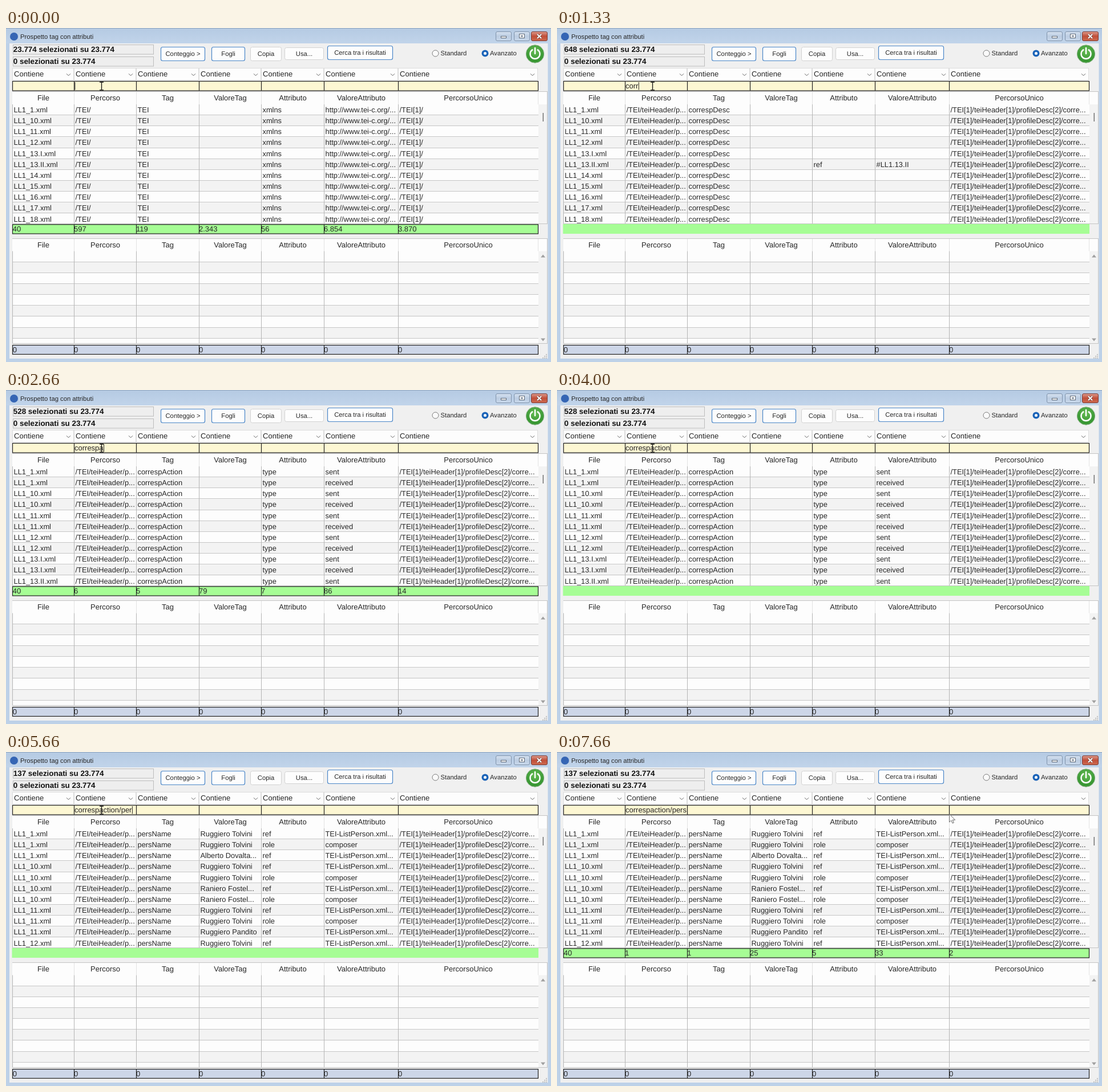
Recreate the animation shown at these times as an HTML page. Size 955 by 586 pixels, loop 8000 ms.

```html
<!DOCTYPE html>
<html lang="it">
<head>
<meta charset="utf-8">
<title>Prospetto tag con attributi</title>
<style>
html, body { margin: 0; width: 100%; height: 100%; overflow: hidden; background: #bdd1e8; }
svg { display: block; width: 955px; height: 586px; }
text { font: 13px "Liberation Sans", Arial, sans-serif; fill: #262626; white-space: pre; text-rendering: geometricPrecision; }
.ui { font-size: 11.25px; }
.cell { font-size: 12.85px; }
.bold { font-size: 13.4px; font-weight: 700; fill: #111; }
.mid { text-anchor: middle; }
</style>
</head>
<body>
<svg id="stage" viewBox="0 0 955 586">
  <defs>
    <linearGradient id="bar" x2="0" y2="1"><stop offset="0" stop-color="#b5cae3"/><stop offset="1" stop-color="#c1d4ea"/></linearGradient>
    <linearGradient id="winBtn" x2="0" y2="1"><stop offset="0" stop-color="#d5e1f0"/><stop offset=".5" stop-color="#bccde2"/><stop offset="1" stop-color="#c8d8eb"/></linearGradient>
    <linearGradient id="closeBtn" x2="0" y2="1"><stop offset="0" stop-color="#dc9a8c"/><stop offset=".5" stop-color="#c14f39"/><stop offset="1" stop-color="#cd6b50"/></linearGradient>
    <radialGradient id="power" cy=".35"><stop offset="0" stop-color="#68bd56"/><stop offset="1" stop-color="#3a9834"/></radialGradient>
    <clipPath id="rowClip"><rect x="11" y="134" width="922" height="210"/></clipPath>
    <clipPath id="fieldClip"><rect x="119" y="93" width="109" height="18"/></clipPath>
  </defs>
  <g id="base"></g>
  <g id="live"></g>
</svg>
<script>
const LOOP = 8000;
const EDGES = [11.5, 119.5, 228.5, 338.5, 447.5, 557.5, 687.5, 932.5];
const HEADS = ['File', 'Percorso', 'Tag', 'ValoreTag', 'Attributo', 'ValoreAttributo', 'PercorsoUnico'];
const ROW = 19.15;
const base = document.getElementById('base');
const live = document.getElementById('live');

function add(parent, tag, attrs, content) {
  const el = document.createElementNS('http://www.w3.org/2000/svg', tag);
  for (const key in attrs) el.setAttribute(key, attrs[key]);
  if (content !== undefined) el.textContent = content;
  parent.append(el);
  return el;
}
const rect = (p, x, y, width, height, fill, more) => add(p, 'rect', { x, y, width, height, fill, ...more });
const path = (p, d, stroke, more) => add(p, 'path', { d, stroke, fill: 'none', ...more });
const label = (p, x, y, str, cls = '') => add(p, 'text', { x, y, class: cls }, str);
const circle = (p, cx, cy, r, fill, more) => add(p, 'circle', { cx, cy, r, fill, ...more });

function cells(p, top, height, fill) {
  const d = EDGES.slice(1, -1).map(x => `M${x} ${top}v${height}`).join('');
  rect(p, 11.5, top, 921, height, fill, { stroke: '#222', 'stroke-width': 1.2 });
  path(p, d, '#222', { 'stroke-width': 1.2 });
}

function sums(p, baseline, values) {
  values.forEach((v, i) => label(p, EDGES[i] + (i ? -.5 : .3), baseline, v));
}

function drawTable(top, first, bottom) {
  rect(base, 11, top, 938, bottom - top, '#fdfdfd');
  rect(base, 933, first, 16, bottom - first, '#f3f3f3');
  let lines = '';
  for (let i = 0, y = first; y < bottom; i++, y += ROW) {
    if (i % 2) rect(base, 11, y, 922, Math.min(ROW, bottom - y), '#f3f3f3');
    if (i) lines += `M11 ${Math.round(y) - .5}H933`;
  }
  path(base, lines, '#c6c6c6');
  path(base, EDGES.slice(1).map(x => `M${x} ${top}V${first}`).join(''), '#e2e2e2');
  path(base, EDGES.slice(0, -1).map(x => `M${x} ${first}V${bottom}`).join(''), '#b5b5b5');
  path(base, `M11 ${top + .5}H949M11 ${bottom - .5}H949M948.5 ${top}V${bottom}`, '#c4c4c4');
  HEADS.forEach((h, i) => label(base, (EDGES[i] + EDGES[i + 1]) / 2, top + 16, h, 'mid'));
}

function button(x, y, w, h, str, strong) {
  rect(base, x + .5, y + .5, w - 1, h - 1, '#fdfdfd', { rx: 3, stroke: strong ? '#4a86c8' : '#d2d2d2', 'stroke-width': strong ? 1.2 : 1 });
  label(base, x + w / 2, y + h / 2 + 3.7, str, 'ui mid');
}

function drawWindow() {
  rect(base, 0, 0, 955, 586, '#bdd1e8');
  rect(base, 0, 0, 955, 27, 'url(#bar)');
  path(base, 'M0 .5H955', '#8fa5bf');
  rect(base, 6, 27, 943.5, 553, '#f0f0f0');
  circle(base, 14, 15, 7, '#3565b4');
  label(base, 25, 19, 'Prospetto tag con attributi', 'ui');

  [[858.5, 'winBtn'], [890.5, 'winBtn'], [920.5, 'closeBtn']].forEach(([x, fill], i) =>
    rect(base, x, 6.5, i > 1 ? 28 : 27, 16, `url(#${fill})`, { rx: 2.5, stroke: i > 1 ? '#7d3c36' : '#8093ab' }));
  rect(base, 867.5, 14.5, 9, 3, '#fff', { stroke: '#5c6775' });
  rect(base, 899.5, 10.5, 9, 7, '#fff', { stroke: '#5c6775' });
  rect(base, 902.5, 13.5, 3, 1.5, '#b9c9dd', { stroke: '#5c6775', 'stroke-width': .8 });
  path(base, 'M931 11l7 7m0-7l-7 7', '#6d423e', { 'stroke-width': 3.6 });
  path(base, 'M931 11l7 7m0-7l-7 7', '#fff', { 'stroke-width': 2.1 });

  [29.5, 50.5].forEach(y => rect(base, 12.5, y, 246, 16.5, '#eeeeee', { stroke: '#bcbcbc' }));
  label(base, 12.8, 62.7, '0 selezionati su 23.774', 'bold');

  button(271, 33, 78, 25, 'Conteggio >', true);
  button(360, 33, 59, 25, 'Fogli', true);
  button(428, 33, 55, 25, 'Copia');
  button(488, 34, 69, 22, 'Usa...');
  button(563, 31, 115, 25, 'Cerca tra i risultati', true);

  circle(base, 752.5, 44.5, 5.5, '#fafafa', { stroke: '#777' });
  label(base, 761.5, 48, 'Standard', 'ui');
  circle(base, 839.5, 44.5, 6, '#1a63b8');
  circle(base, 839.5, 44.5, 2.5, '#fff');
  label(base, 848, 48, 'Avanzato', 'ui');

  circle(base, 927, 45.5, 15.7, 'url(#power)', { stroke: '#8db58a' });
  path(base, 'M922.3 38.4a8.5 8.5 0 1 0 9.4 0M927 35v10', '#fff', { 'stroke-width': 2.5, 'stroke-linecap': 'round' });

  EDGES.slice(0, -1).forEach((x, i) => {
    const end = EDGES[i + 1];
    rect(base, x, 70.5, end - x - 1, 21, '#fdfdfd', { stroke: '#dcdcdc' });
    label(base, x + 2.6, 85, 'Contiene');
    path(base, `M${end - 13.5} 80.2l3.5 3.5l3.5-3.5`, '#666');
  });

  drawTable(111, 134, 344);
  path(base, 'M941.3 149V164', '#777', { 'stroke-width': 1.6 });
  drawTable(369, 391.5, 554);
  path(base, 'M937 402.5h8l-4-5zM937 544.5h8l-4 5z', 'none', { fill: '#a0a0a0' });
  cells(base, 93.5, 16.5, '#fdf7d3');
  cells(base, 556.5, 16, '#cdd6e8');
  sums(base, 569, Array(7).fill('0'));
  for (let i = 0; i < 3; i++)
    for (let j = 0; j <= i; j++) rect(base, 946 - j * 3, 572 + i * 3, 1.8, 1.8, '#b8b8b8');
}

// Result sets: each returns the seven columns of a row
const SINGLE = '1 10 11 12 13.I 13.II 14 15 16 17 18'.split(' ');
const HEADER = '/TEI[1]/teiHeader[1]/';
const PROFILE = HEADER + 'profileDesc[2]/corre...';
const xml = n => `LL1_${n}.xml`;

const allTags = SINGLE.map(n => [xml(n), '/TEI/', 'TEI', '', 'xmlns', 'http://www.tei-c.org/...', '/TEI[1]/']);
const fileDesc = SINGLE.map(n => [xml(n), '/TEI/teiHeader/fi...', 'fileDesc', '', '', '', HEADER + 'fileDesc[1]/']);
const contents = SINGLE.map(n => [xml(n), '/TEI/teiHeader/fi...', 'msContents', '', '', '', HEADER + 'fileDesc[1]/sourceD...']);
const descs = SINGLE.map(n => {
  const linked = n === '13.II';
  return [xml(n), '/TEI/teiHeader/p...', 'correspDesc', '', linked ? 'ref' : '', linked ? '#LL1.13.II' : '', PROFILE];
});
const actions = SINGLE.map((_, i) =>
  [xml(SINGLE[i >> 1]), '/TEI/teiHeader/p...', 'correspAction', '', 'type', i % 2 ? 'received' : 'sent', PROFILE]);

const PEOPLE = ['Ruggiero Tolvini', 'Alberto Dovalta...', 'Raniero Fostel...', 'Ruggiero Pandito'];
const persons = [
  [1, 0, 'ref'], [1, 0, 'role'], [1, 1, 'ref'],
  [10, 0, 'ref'], [10, 0, 'role'], [10, 2, 'ref'], [10, 2, 'role'],
  [11, 0, 'ref'], [11, 0, 'role'], [11, 3, 'ref'], [12, 0, 'ref']
].map(([n, who, attr]) => [xml(n), '/TEI/teiHeader/p...', 'persName', PEOPLE[who], attr,
  attr === 'ref' ? 'TEI-ListPerson.xml...' : 'composer', PROFILE]);

const ALL_SUMS = ['40', '597', '119', '2.343', '56', '6.854', '3.870'];
const ACTION_SUMS = ['40', '6', '5', '79', '7', '86', '14'];
const PERSON_SUMS = ['40', '1', '1', '25', '5', '33', '2'];
const WORD = 'correspaction/pers';

// start, typed letters, selected, rows, totals, pointer [x, y, arrow]
const STEPS = [
  [0, 0, '23.774', allTags, ALL_SUMS],
  [330, 1, '12.846', fileDesc],
  [660, 2, '1.391', contents],
  [1000, 3, '648', descs],
  [1330, 4, '648', descs],
  [2000, 6, '648', descs],
  [2330, 7, '648', descs],
  [2660, 8, '528', actions, ACTION_SUMS],
  [3000, 9, '528', actions],
  [3330, 10, '528', actions],
  [3660, 12, '528', actions],
  [4000, 13, '528', actions],
  [4330, 13, '528', actions, ACTION_SUMS],
  [5000, 14, '343', persons],
  [5330, 15, '226', persons],
  [5660, 17, '137', persons],
  [6000, 18, '137', persons],
  [6330, 18, '137', persons, PERSON_SUMS],
  [7000, 18, '137', persons, PERSON_SUMS, [340, 104]],
  [7330, 18, '137', persons, PERSON_SUMS, [600, 107]],
  [7660, 18, '137', persons, PERSON_SUMS, [687, 109, true]]
];

function drawPointer([x, y, arrow]) {
  if (arrow) {
    path(live, `M${x + .5} ${y}v14l3.3-3l2.3 5l2.2-1l-2.2-4.8h4.5z`, '#666', { fill: '#fff' });
  } else {
    path(live, `M${x - 3.5} ${y - 7}h3l.5 .5l.5-.5h3M${x} ${y - 6.5}v13M${x - 3.5} ${y + 7}h3l.5-.5l.5 .5h3`, '#111', { 'stroke-width': 1.3 });
  }
}

function render([, letters, count, rows, totals, pointer = [167.5, 102]]) {
  live.replaceChildren();
  label(live, 12.8, 42, `${count} selezionati su 23.774`, 'bold');

  const field = add(live, 'g', { 'clip-path': 'url(#fieldClip)' });
  const typed = label(field, 120, 106, WORD.slice(0, letters));
  if (letters < WORD.length) {
    const end = letters ? typed.getComputedTextLength() : 0;
    path(field, `M${120.9 + end} 95v13.5`, '#222');
  }

  const body = add(live, 'g', { 'clip-path': 'url(#rowClip)' });
  rows.forEach((row, i) => row.forEach((str, c) => {
    if (str) label(body, EDGES[c] + 2, 148 + i * ROW, str, 'cell');
  }));

  if (totals) {
    cells(live, 344.8, 16.2, '#a6fd95');
    sums(live, 357, totals);
  } else {
    rect(live, 10.5, 344, 922.5, 17, '#a6fd95');
  }
  drawPointer(pointer);
}

let shown;
function tick() {
  const t = performance.now() % LOOP;
  const step = STEPS.findLast(s => s[0] <= t);
  if (step !== shown) render(shown = step);
  requestAnimationFrame(tick);
}

drawWindow();
tick();
</script>
</body>
</html>
```
